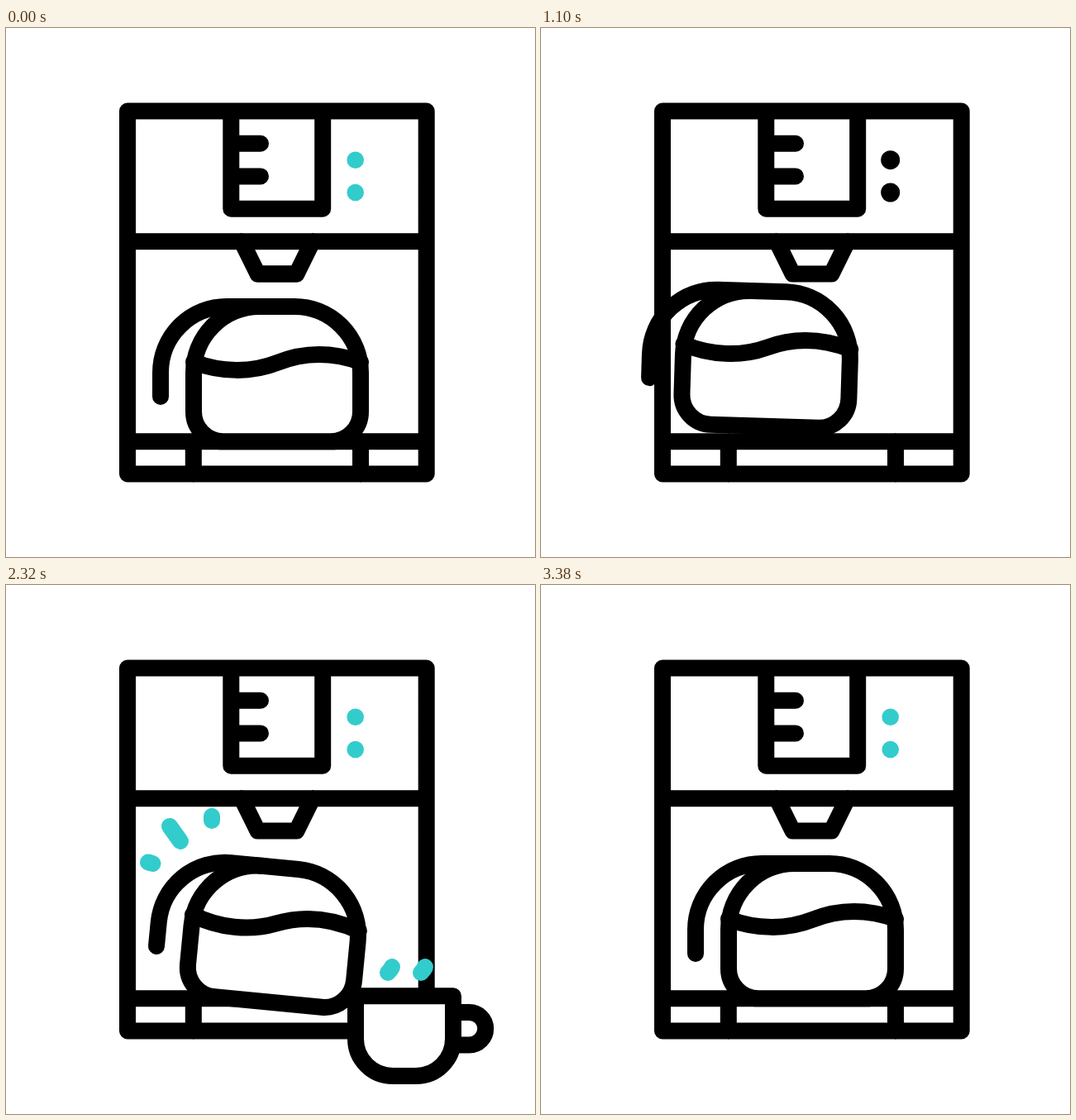
An HTML page with a canvas for the animation above (3600 ms loop, 640 by 640 pixels).

```html
<!DOCTYPE html>
<html lang="en">
<head>
<meta charset="utf-8">
<title>Coffee machine</title>
<style>
  html, body { margin: 0; width: 100%; height: 100%; overflow: hidden; background: #fff; }
  canvas { display: block; width: 100vmin; height: 100vmin; }
</style>
</head>
<body>
<canvas id="stage" width="640" height="640"></canvas>
<script>
const ctx = document.getElementById('stage').getContext('2d');
const LOOP = 3600;
const BLACK = '#000';
const TEAL = '#33cccc';
const WHITE = '#fff';

const machine = new Path2D(`
  M147 100.5H508.7V539.5H147Z
  M147 258.2H508.7 M147 500.2H508.7
  M226.8 500V539.7 M429 500V539.7
  M272.3 100.5V218.8H383.2V100.5
  M272.3 139.8H308 M272.3 179.4H308
  M285 258L304.5 297.5H351.5L371 258`);

const potBody = new Path2D(`
  M307 337H349A80 80 0 0 1 429 417V464A36 36 0 0 1 393 500.3
  H263A36 36 0 0 1 227 464V417A80 80 0 0 1 307 337Z`);
const potLines = new Path2D(`
  M307 337H267A80 80 0 0 0 187 417V446
  M227 404C260 417 298 417 328 405C360 392 395 392 429 404`);

const cupBody = new Path2D('M423 497.3H541V549A45 45 0 0 1 496 594H468A45 45 0 0 1 423 549Z');
const cupHandle = new Path2D('M541 517H560.5A19.7 19.7 0 0 1 560.5 556.4H541');

// A path of which only the part between two fractions is drawn.
function trail(d) {
  const el = document.createElementNS('http://www.w3.org/2000/svg', 'path');
  el.setAttribute('d', d);
  return { path: new Path2D(d), length: el.getTotalLength() };
}

const brew = trail('M328 298V402');
const pour = trail('M375 396C414 408 447 449 447 500');
const longSpark = trail('M211 310L183 271');
const sideSparks = [trail('M177.5 337L146 328'), trail('M249 285V255')];
const steam = trail('M462 469C468 463 470 457 466.5 450.5C461 440 451 430 463 416');

const ramp = (t, from, to) => Math.min(1, Math.max(0, (t - from) / (to - from)));
const ease = (t, from, to) => {
  const u = ramp(t, from, to);
  return u * u * (3 - 2 * u);
};
const mix = (a, b, u) => a.map((v, i) => v + (b[i] - v) * u);

function stroke(path, color = BLACK) {
  ctx.strokeStyle = color;
  ctx.stroke(path);
}

function fill(path) {
  ctx.fillStyle = WHITE;
  ctx.fill(path);
}

function drawTrail({ path, length }, tail, head) {
  if (head - tail < 0.002) return;
  ctx.setLineDash([(head - tail) * length, length * 2]);
  ctx.lineDashOffset = -tail * length;
  stroke(path, TEAL);
  ctx.setLineDash([]);
}

// Pot pose: x shift, y shift, tilt in degrees.
const REST = [0, 0, 0];
const LIFTED = [-57, -21, 0];
const POURING = [-19.5, 30.2, 36];

function potPose(t) {
  if (t < 1020) return mix(REST, LIFTED, ease(t, 580, 980));
  if (t < 2020) return mix(LIFTED, POURING, ease(t, 1020, 1620));
  return mix(POURING, REST, ease(t, 2020, 2420));
}

function inPose([x, y, tilt], draw) {
  ctx.save();
  ctx.translate(328 + x, 418 + y);
  ctx.rotate(tilt * Math.PI / 180);
  ctx.translate(-328, -418);
  draw();
  ctx.restore();
}

function drawButtons(t) {
  const off = t < 1200 && Math.floor(t / 200) % 2 === 1;
  ctx.fillStyle = off ? BLACK : TEAL;
  for (const y of [159.7, 199]) {
    ctx.beginPath();
    ctx.arc(422.7, y, off ? 11.5 : 10.3, 0, Math.PI * 2);
    ctx.fill();
  }
}

function drawCup(t) {
  const x = 228 * (1 - ease(t, 1240, 1480) + ease(t, 3180, 3380));
  if (x >= 228) return;
  ctx.save();
  ctx.translate(x, 0);
  stroke(cupHandle);
  fill(cupBody);
  stroke(cupBody);
  ctx.restore();
}

function render(t) {
  ctx.fillStyle = WHITE;
  ctx.fillRect(0, 0, 640, 640);
  ctx.lineWidth = 20;
  ctx.lineCap = ctx.lineJoin = 'round';

  const pose = potPose(t);
  stroke(machine);
  drawButtons(t);
  drawTrail(pour, ease(t, 1880, 2060), ramp(t, 1600, 1860));

  inPose(pose, () => fill(potBody));
  drawTrail(brew, ease(t, 320, 595), ramp(t, 70, 320));
  // The nozzle covers the start of the stream.
  if (t < 600) stroke(new Path2D('M304.5 297.5H351.5'));
  inPose(pose, () => {
    stroke(potBody);
    stroke(potLines);
  });

  drawTrail(longSpark, ramp(t, 2420, 2560), ramp(t, 2270, 2380));
  for (const spark of sideSparks) drawTrail(spark, ramp(t, 2460, 2600), ramp(t, 2300, 2420));

  const steamTail = ease(t, 2800, 3060);
  const steamHead = ramp(t, 2240, 2800);
  for (const x of [0, 40]) {
    ctx.save();
    ctx.translate(x, 0);
    drawTrail(steam, steamTail, steamHead);
    ctx.restore();
  }
  drawCup(t);
}

const start = performance.now();
function tick() {
  render((performance.now() - start) % LOOP);
  requestAnimationFrame(tick);
}
tick();
</script>
</body>
</html>
```
